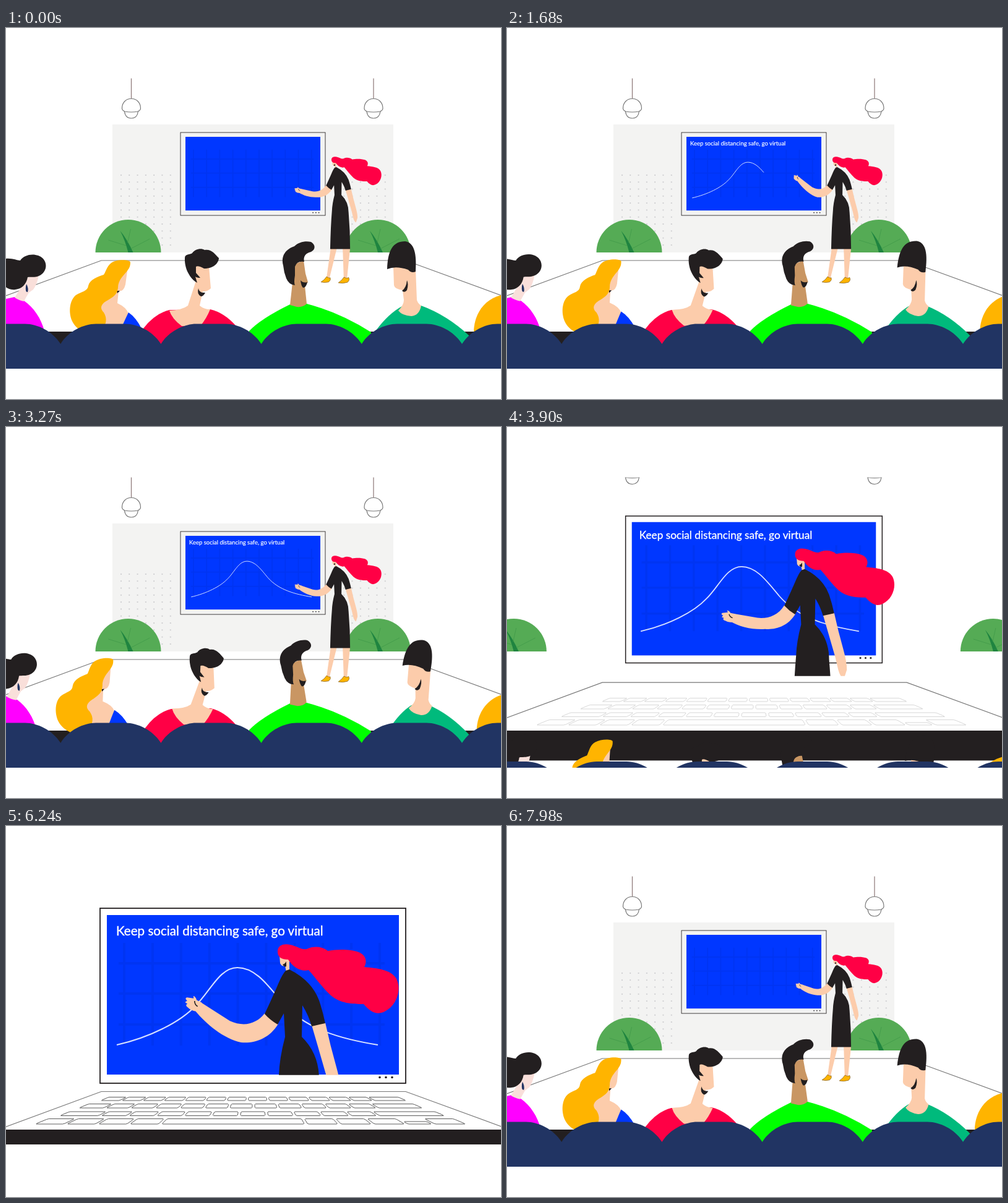
Write an HTML page that moves like this. It is 800x600 px and loops after 8000 ms.

```html
<!DOCTYPE html>
<html lang="en">
<head>
<meta charset="utf-8">
<title>Virtual lecture</title>
<style>
  html, body { margin: 0; height: 100%; overflow: hidden; background: #fff; }
  svg { display: block; width: 100vw; height: 100vh; }
  .ink { fill: #231f20; }
  .skin { fill: #fcccab; }
  .line { fill: none; stroke: #777; stroke-width: 1.2; }
  .yellow { fill: #ffb400; }
  .red { fill: #ff0045; }
  .navy { fill: #213463; }
</style>
</head>
<body>
<svg viewBox="0 0 800 600">
  <defs>
    <clipPath id="stage"><rect y="81.5" width="800" height="469.5"/></clipPath>
    <clipPath id="knee"><rect id="kneeRect" width="800" height="600"/></clipPath>
    <pattern id="dots" width="13.3" height="11.3" patternUnits="userSpaceOnUse">
      <circle cx="2" cy="2" r="1" fill="#c4c4c8"/>
    </pattern>
    <g id="plantShape">
      <path d="M-53 0A53 53 0 0 1 53 0Z" fill="#55ab55"/>
      <path d="M-13 -35Q-2 -22 8 0H0Q-5 -20 -13 -35Z" fill="#1f8440"/>
      <path d="M4 -6L35 -22M-3 -11L-32 -20M-1 -16L4 -38" fill="none" stroke="#419a49" stroke-width=".8"/>
    </g>
    <g id="lampShape" class="line">
      <path d="M0 70V114" stroke="#8a7474"/>
      <path d="M-15 130C-15 109 15 109 15 130Q15 133 10.500 135Q0 137 -10.500 135Q-15 133 -15 130Z"/>
      <path d="M-11 135Q-9.500 146 0 146Q9.500 146 11 135"/>
    </g>
  </defs>

  <g clip-path="url(#stage)">
    <g id="wall">
      <rect x="172" y="156" width="454" height="207" fill="#f3f3f2"/>
      <rect width="84" height="117" fill="url(#dots)" transform="translate(184 236)"/>
      <rect width="84" height="117" fill="url(#dots)" transform="translate(531 236)"/>
    </g>
    <use id="plantL" href="#plantShape"/>
    <use id="plantR" href="#plantShape"/>
    <g id="lamps">
      <use href="#lampShape" x="202.500"/>
      <use href="#lampShape" x="594"/>
    </g>
    <path id="floor" class="line" d="M-3 434L154 376H646L803 433.500"/>

    <g id="monitor">
      <rect x="152" y="133" width="494" height="283" fill="none" stroke="#231f20" stroke-width="1.8"/>
      <g class="ink"><circle cx="604" cy="406.500" r="1.8"/><circle cx="614" cy="406.500" r="1.8"/><circle cx="624" cy="406.500" r="1.8"/></g>
    </g>
    <g id="screen">
      <rect x="163" y="144" width="472" height="258" fill="#0037ff"/>
      <path id="grid" fill="none" stroke="#0034f2" stroke-width="4"/>
      <text id="title" x="178" y="177" font-size="20.6" fill="#fff" stroke="#fff" stroke-width=".4" font-family="Lato, sans-serif">Keep social distancing safe, go virtual</text>
      <path id="curve" pathLength="1" stroke-dasharray="1 2" fill="none" stroke="#d5e0ff" stroke-width="2.1"
        d="M179 354C232 342 282 317 306 291C330 268 345 229 374 229C404 229 425 260 447 286C485 330 545 345 601 354"/>
    </g>

    <g clip-path="url(#knee)">
      <g id="speaker">
        <path class="skin" d="M436 550H460L432 664H420ZM483 550H512L500 666H487Z"/>
        <g class="yellow" stroke="#6b4a12" stroke-width="1.5">
          <path d="M398 682Q412 674 420 661Q430 668 434 665Q438 674 428 682Q412 686 398 682Z"/>
          <path d="M466 685Q480 675 488 663Q500 670 506 664Q512 674 502 683Q484 689 466 685Z"/>
        </g>
        <path id="arm" class="skin"/>
        <g id="hand">
          <path class="skin" d="M322 304L313 301Q311 296 307 295L308 299L297 299Q293 301 298 304L295 307L299 309Q295 312 301 315Q307 320 316 319Z"/>
          <path d="M310 303Q311 309 316 311" fill="none" stroke="#231f20" stroke-width="1.6"/>
        </g>
        <path class="skin" d="M494 322L516 318Q524 355 534 390Q541 415 541 430L535 449Q528 445 524 430L518 405Q508 370 494 322Z"/>
        <path class="skin" d="M442 207L443 222Q446 228 451 226L453 236L458 233L458 212Z"/>
        <path class="ink" d="M447 224Q451 223 453 219L453 227Q450 229 447 224Z"/>
        <path class="ink" d="M452 234L458 232Q494 250 506 282Q512 300 516 319L494 324Q489 306 479 290L478 341Q506 368 506 410Q512 480 512 553H434Q436 460 441 403Q442 375 451 341L449 303L439 321Q427 314 418 304Q427 285 438 260Q446 240 452 234Z"/>
        <path class="red" d="M439 203C439 192 450 190 459 192C470 194 478 201 486 199C498 193 512 195 520 202C535 199 557 199 570 204C582 209 584 219 579 228C600 230 622 232 631 247C640 265 631 291 612 300C600 306 590 302 578 288C560 288 540 287 525 274C510 260 500 245 489 233C478 236 465 230 456 216C445 216 439 212 439 203Z"/>
      </g>
    </g>

    <path id="keys" fill="none" stroke="#4a4a4a" stroke-width=".9" stroke-linejoin="round"/>
    <rect id="edge" class="ink" y="491" width="800"/>

    <g id="ann">
      <path class="body" fill="#f0f" d="M-60 430L0 438L14 435Q22 440 29 441C45 452 57 470 62 490V530H-60Z"/>
      <g class="head">
        <path fill="#f9dfda" d="M33 403L53 400Q50 415 44 423L37 428Q32 436 29 442Q22 441 14 436L25 418Z"/>
        <path class="navy" d="M33 414Q37 421 35 427Q31 428 32 418Z"/>
        <path class="ink" d="M-40 373H0C10 372 18 376 23 376C30 365 50 363 60 373C68 382 65 396 53 401C46 404 40 402 35 403C33 415 25 422 15 423C8 424 2 421 0 419H-40Z"/>
      </g>
    </g>
    <g id="bea">
      <g class="head">
        <path class="skin" d="M197 386L193 415Q190 427 182 425L180 445Q195 452 198 462L188 490H150V450L178 425L182 400Z"/>
        <path fill="#0037ff" d="M186 486Q193 470 198 460Q210 468 219 486Z"/>
        <path class="ink" d="M179 425L184 425L180 429Z"/>
        <path class="yellow" d="M201 379C201 375 180 373 170 380C163 385 160 397 158 399C148 402 135 407 133 417C132 426 122 426 113 432C103 440 101 458 106 472C110 482 118 488 125 492H152C163 480 164 470 158 460C150 452 155 445 165 440C175 434 180 430 181 420C181 408 190 400 195 394C200 388 201 384 201 379Z"/>
      </g>
    </g>
    <g id="carl">
      <path class="body red" d="M221 487Q240 462 264 456L330 455Q352 460 371 481V530H221Z"/>
      <g class="head">
        <path class="skin" d="M306 385L314 383L328 386L331 421Q325 427 318 426L313 449Q320 455 330 455Q324 470 314 482H284Q268 470 264 457Q285 456 294 449L306 412Z"/>
        <path class="ink" d="M311 421Q312 429 322 428Q319 434 315 434Q308 430 311 421Z"/>
        <path class="ink" d="M289 372C289 365 297 367 301 364C305 358 315 355 321 359C332 357 338 366 344 372C344 378 338 389 320 389C315 386 309 384 307 386V396L314 404Q308 404 306 402L309 412C300 408 293 395 291 388C289 380 289 378 289 372Z"/>
      </g>
    </g>
    <g id="dan">
      <path class="body" fill="#0f0" d="M393 490Q412 470 459 447L486 446Q540 460 590 492V530H393Z"/>
      <g class="head">
        <path fill="#c99663" d="M466 382L481 376L484 397L488 411L483 417L486 446Q480 452 470 451L459 448L463 412Z"/>
        <path class="ink" d="M476 408Q480 413 487 411Q485 420 480 420Q477 417 476 408Z"/>
        <path class="ink" d="M448 384C444 368 452 358 466 353C473 346 484 344 493 346C500 350 501 358 493 362C484 364 480 370 482 378Q470 376 467 386V400Q465 412 467 416Q457 415 453 405Q449 395 448 384Z"/>
      </g>
    </g>
    <g id="eli">
      <path class="body" fill="#00ba7c" d="M598 489Q618 462 640 450L671 449Q712 464 748 497V530H598Z"/>
      <g class="head">
        <path class="skin" d="M626 386L662 390L664 440Q666 446 671 449Q668 465 655 466Q640 465 634 457Q643 448 643 440L641 424Q628 422 627 416Z"/>
        <path class="ink" d="M640 425Q647 420 648 408Q651 414 648 424Q644 429 640 425Z"/>
        <path class="ink" d="M616 390C617 360 625 345 645 345C660 347 664 365 662 394Q655 397 650 391Q630 384 616 390Z"/>
      </g>
    </g>
    <path id="fay" class="yellow" d="M756 490C757 465 770 440 800 432H830V530H756Z"/>
    <path id="chairs" class="navy"/>
  </g>
</svg>
<script>
const $ = id => document.getElementById(id);
const clamp = v => Math.max(0, Math.min(1, v));
const lerp = (a, b, p) => a + (b - a) * p;
const ramp = (t, start, length) => clamp((t - start) / length);
const ease = u => (1 - Math.cos(Math.PI * u)) / 2;
const move = (id, value) => $(id).setAttribute("transform", value);

// Sway at unit lean: head shift and turn around a pivot, body squeeze around an x; drop is the way out.
const audience = [
  { id: "ann", dx: -10, turn: -1.5, pivot: [20, 440], anchor: -200, squeeze: -.038, drop: 190 },
  { id: "bea", dx: -17, turn: -2.8, pivot: [160, 478], anchor: 0, squeeze: 0, drop: 190 },
  { id: "carl", dx: 3, turn: 1.9, pivot: [300, 470], anchor: 372, squeeze: -.02, drop: 218 },
  { id: "dan", dx: 0, turn: -2.6, pivot: [472, 450], anchor: 0, squeeze: 0, drop: 222 },
  { id: "eli", dx: 12.5, turn: 5.2, pivot: [655, 465], anchor: 748, squeeze: -.11, drop: 222 }
];

// Vertical hand offset over time, in speaker units.
const handPoses = [[0, 14], [870, -50], [2370, -17], [3900, 17], [5310, 0], [6100, -20], [7170, -1], [8000, 5]];

function handOffset(t) {
  const i = handPoses.findIndex(pose => pose[0] > t);
  const [t0, y0] = handPoses[i - 1], [t1, y1] = handPoses[i];
  return lerp(y0, y1, ease((t - t0) / (t1 - t0)));
}

function buildGrid() {
  let d = "M182 222H612M182 271H612M182 321H612";
  for (let i = 0; i < 10; i++) d += `M${191 + i * 45.9} 189V355`;
  $("grid").setAttribute("d", d);
}

function buildChairs() {
  let d = "";
  for (let i = 0; i < 6; i++) {
    const x = -74 + i * 162.2;
    d += `M${x} 511c12 -20 37 -32.500 57 -32.500h48c20 0 45 12.500 57.200 32.500v140h-162.200z`;
  }
  $("chairs").setAttribute("d", d);
}

function buildKeys() {
  const same = (n, w) => Array(n).fill(w);
  const rows = [
    [438.5, 444, -214, [...same(13, 29.3), 47]],
    [449.5, 456, -220, [34, ...same(11, 31), 58]],
    [462, 468.5, -221, [47, ...same(10, 31.5), 77]],
    [473.5, 482, -226, [...same(4, 32.5), 150, ...same(3, 34.3), 28, 35]]
  ];
  const at = (u, y) => `${(400 + u * (1 + (y - 429) * .0108)).toFixed(1)} ${y}`;
  let d = "";
  for (const [top, bottom, start, widths] of rows) {
    let u = start;
    for (const w of widths) {
      const y = w === 28 ? 478 : top, a = u + 1.7, b = u + w - 1.7;
      d += `M${at(a + 1, y)}L${at(b - 1, y)}L${at(b, y + 1)}L${at(b, bottom - 1)}L${at(b - 1, bottom)}L${at(a + 1, bottom)}L${at(a, bottom - 1)}L${at(a, y + 1)}Z`;
      u += w;
    }
  }
  $("keys").setAttribute("d", d);
}

// Shrinks artwork drawn at its large size so that its corner goes from `small` to `large`.
function zoom(id, small, large, scale, p) {
  const x = lerp(small[0], large[0], p), y = lerp(small[1], large[1], p);
  move(id, `translate(${x} ${y}) scale(${lerp(scale, 1, p)}) translate(${-large[0]} ${-large[1]})`);
}

function drawArm(dy) {
  const dx = Math.min(0, dy * .33), k = dy * .12;
  $("arm").setAttribute("d",
    `M418 303C405 ${322 + k} 385 ${328 + k} ${365 + dx * .5} ${322 + dy * .35}L${319 + dx} ${303 + dy}` +
    `L${312 + dx} ${318 + dy}C${330 + dx} ${334 + dy * .7} ${355 + dx * .5} ${348 + dy * .2} 380 350C400 352 425 345 440 320Z`);
  move("hand", `translate(${dx} ${dy}) rotate(${-dy * .4} 316 311)`);
}

function render(t) {
  const p = ease(ramp(t, 3650, 400)) - ease(ramp(t, 7170, 400));
  const lean = 1.45 * Math.sin(.325 * t / 1000);

  $("wall").setAttribute("opacity", clamp(1 - p * 1.6));
  move("plantL", `translate(${lerp(197.5, -71, p)} 363)`);
  move("plantR", `translate(${lerp(601, 867, p)} 363)`);
  move("lamps", `translate(0 ${-77 * p})`);
  move("floor", `translate(0 ${53.5 * p})`);
  zoom("monitor", [282, 169], [152, 133], .4737, p);
  zoom("screen", [290, 176], [163, 144], .4619, p);
  zoom("speaker", [526, 208], [439, 191], .413, p);
  $("kneeRect").setAttribute("height", p ? lerp(414, 402.7, clamp(p * 8)) : 600);

  $("title").setAttribute("opacity", ramp(t, 1020, 560) - ramp(t, 6560, 480));
  move("title", `translate(${-2 * (1 - p)} ${-2 * (1 - p)})`);
  const curve = $("curve");
  curve.setAttribute("stroke-dashoffset", 1 - ramp(t, 165, 2505));
  curve.setAttribute("opacity", t < 165 ? 0 : 1 - ramp(t, 7180, 300));
  move("curve", `translate(${4 * (1 - p)} ${4 * (1 - p)})`);
  drawArm(handOffset(t));

  $("keys").setAttribute("opacity", clamp((p - .6) / .4));
  $("edge").setAttribute("height", lerp(104, 24, p));

  for (const { id, dx, turn, pivot, anchor, squeeze, drop } of audience) {
    move(id, `translate(0 ${drop * p})`);
    $(id).querySelector(".head").setAttribute("transform", `translate(${dx * lean} 0) rotate(${turn * lean} ${pivot})`);
    const body = $(id).querySelector(".body");
    if (body) body.setAttribute("transform", `translate(${anchor} 0) scale(${1 + squeeze * lean} 1) translate(${-anchor} 0)`);
  }
  move("fay", `translate(${8.5 * Math.sin(t * Math.PI / 4000)} ${146 * p})`);
  move("chairs", `translate(0 ${90 * p})`);
}

function frame() {
  render(performance.now() % 8000);
  requestAnimationFrame(frame);
}

buildGrid();
buildChairs();
buildKeys();
frame();
</script>
</body>
</html>
```
